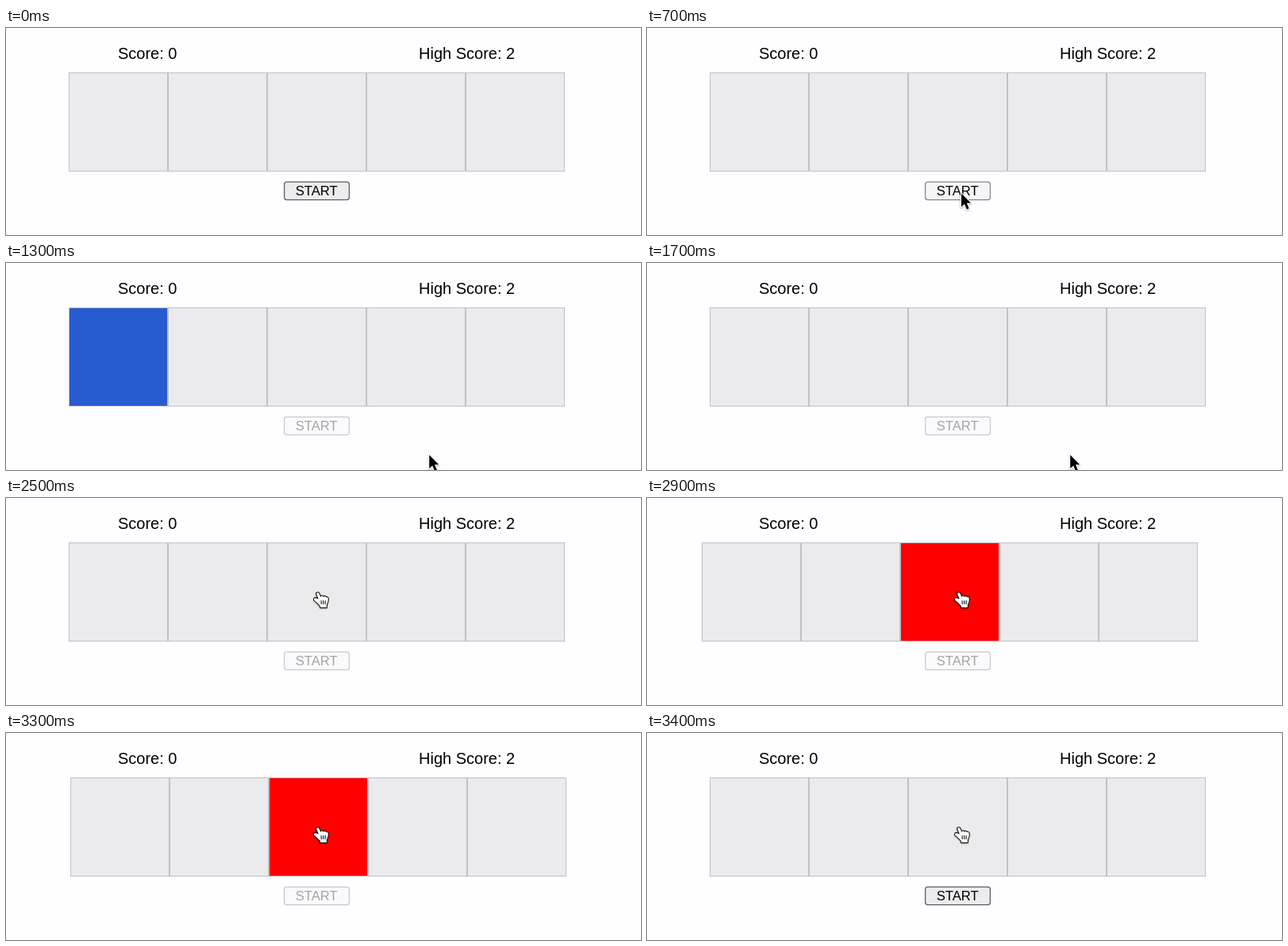
Write an HTML page with a canvas that moves like this. It is 800 px wide and 261 px high and loops after 4400 ms.

```html
<!DOCTYPE html>
<html lang="en">
<head>
<meta charset="utf-8">
<title>Memory game</title>
<style>
  html, body { margin: 0; width: 100%; height: 100%; overflow: hidden; background: #fefdff; }
  canvas { display: block; width: 800px; height: 261px; }
</style>
</head>
<body>
<canvas></canvas>
<script>
const W = 800, H = 261, LOOP = 4400, TICK = 100;
const CELL = 125, LEFT = 79, TOP = 56;
const SHAKE = [-10, 10, -7, 10, 2];
const FONT = '"Liberation Sans", Arial, sans-serif';

const BUTTON = {
  idle:     { fill: '#ecebed', line: '#5c5b5e', text: '#000' },
  hover:    { fill: '#e5e4e6', line: '#4f4e51', text: '#000' },
  pressed:  { fill: '#f5f4f6', line: '#858487', text: '#000' },
  disabled: { fill: '#faf9fb', line: '#c9c8ca', text: '#a5a4a6' }
};

// Pointer moves: start time, number of steps, from, to
const MOVES = [
  [200, 4, [399, 262], [396, 208.5]],
  [1000, 4, [396, 208.5], [533.2, 242]],
  [2100, 5, [533.2, 242], [392, 119]]
];

const ARROW = new Path2D('M0 0V17L4 13.4L6.9 20.2L9.7 19L6.8 12.3H12.1Z');
const HAND = new Path2D(
  'M1.9 8.6L-.8 2.6C-1.6 .6 1.4 -.8 2.5 1.4L4.5 6.1' +
  'C5 3.8 7.7 4.1 8.1 6C8.9 4.3 11.1 4.9 11.4 6.6' +
  'C12.4 5.5 13.9 6.3 13.8 8.4C13.8 11 13.2 13.2 12 15.2L11.8 18.9H4.2' +
  'L3.6 16.8C1.5 14.8 -.5 12.5 -3.3 10.3C-5 8.8 -3.5 6.5 -1.5 7.3Z'
);
const CREASES = new Path2D('M5 10.2L5.3 15M7.6 10.2L7.8 15M10.2 10.2L10.1 15');

const canvas = document.querySelector('canvas');
const ctx = canvas.getContext('2d');
const scale = window.devicePixelRatio || 1;
canvas.width = W * scale;
canvas.height = H * scale;

const within = (t, from, to) => t >= from && t < to;
const smooth = p => p * p * (3 - 2 * p);

function pointerAt(t) {
  const move = MOVES.filter(m => t >= m[0]).pop();
  if (!move) return null;
  const [start, steps, from, to] = move;
  const p = smooth(Math.min(1, ((t - start) / TICK + 1) / steps));
  return from.map((v, i) => v + (to[i] - v) * p);
}

function buttonState(t) {
  if (within(t, 400, 700)) return 'hover';
  if (within(t, 700, 800)) return 'pressed';
  if (within(t, 800, 3400)) return 'disabled';
  return 'idle';
}

function label(text, x, y, size, color, align = 'left') {
  ctx.font = `${size}px ${FONT}`;
  ctx.textAlign = align;
  ctx.fillStyle = color;
  ctx.fillText(text, x, y);
}

function drawCells(t) {
  const dx = within(t, 2900, 3400) ? SHAKE[(t - 2900) / TICK] : 0;
  for (let i = 0; i < 5; i++) {
    const x = LEFT + dx + i * CELL;
    let fill = '#ebeaec';
    if (i === 0 && within(t, 1200, 1700)) fill = '#285bd0';
    if (i === 2 && within(t, 2900, 3400)) fill = '#ff0000';
    ctx.fillStyle = '#c1c0c2';
    ctx.fillRect(x, TOP, CELL, CELL);
    ctx.fillStyle = fill;
    ctx.fillRect(x + 1, TOP + 1, CELL - 2, CELL - 2);
  }
}

function drawButton(t) {
  const look = BUTTON[buttonState(t)];
  ctx.beginPath();
  ctx.roundRect(350.6, 194, 81.8, 22.6, 3);
  ctx.fillStyle = look.fill;
  ctx.fill();
  ctx.strokeStyle = look.line;
  ctx.lineWidth = 1.25;
  ctx.stroke();
  label('START', 391.2, 211, 16.67, look.text, 'center');
}

function outline(path, fill, line, width) {
  ctx.shadowColor = 'rgba(0, 0, 0, .3)';
  ctx.shadowBlur = 2 * scale;
  ctx.shadowOffsetY = scale;
  ctx.lineWidth = width;
  ctx.strokeStyle = line;
  ctx.stroke(path);
  ctx.shadowColor = 'transparent';
  ctx.fillStyle = fill;
  ctx.fill(path);
}

function drawPointer(t) {
  const pos = pointerAt(t);
  if (!pos) return;
  const [x, y] = pos;
  const overCell = within(y, TOP, TOP + CELL) && within(x, LEFT, LEFT + 5 * CELL);
  ctx.save();
  ctx.translate(x, y);
  ctx.lineJoin = 'round';
  if (overCell) {
    outline(HAND, '#fff', '#000', 2);
    ctx.lineWidth = 1;
    ctx.stroke(CREASES);
  } else {
    outline(ARROW, '#000', '#fff', 2.4);
  }
  ctx.restore();
}

function draw(t) {
  ctx.setTransform(scale, 0, 0, scale, 0, 0);
  ctx.fillStyle = '#fefdff';
  ctx.fillRect(0, 0, W, H);
  label('Score: 0', 141, 39, 20, '#000');
  label('High Score: 2', 520, 39, 20, '#000');
  drawCells(t);
  drawButton(t);
  drawPointer(t);
}

const begin = performance.now();
function frame() {
  const t = (performance.now() - begin) % LOOP;
  draw(Math.floor(t / TICK) * TICK);
  requestAnimationFrame(frame);
}
frame();
</script>
</body>
</html>
```
